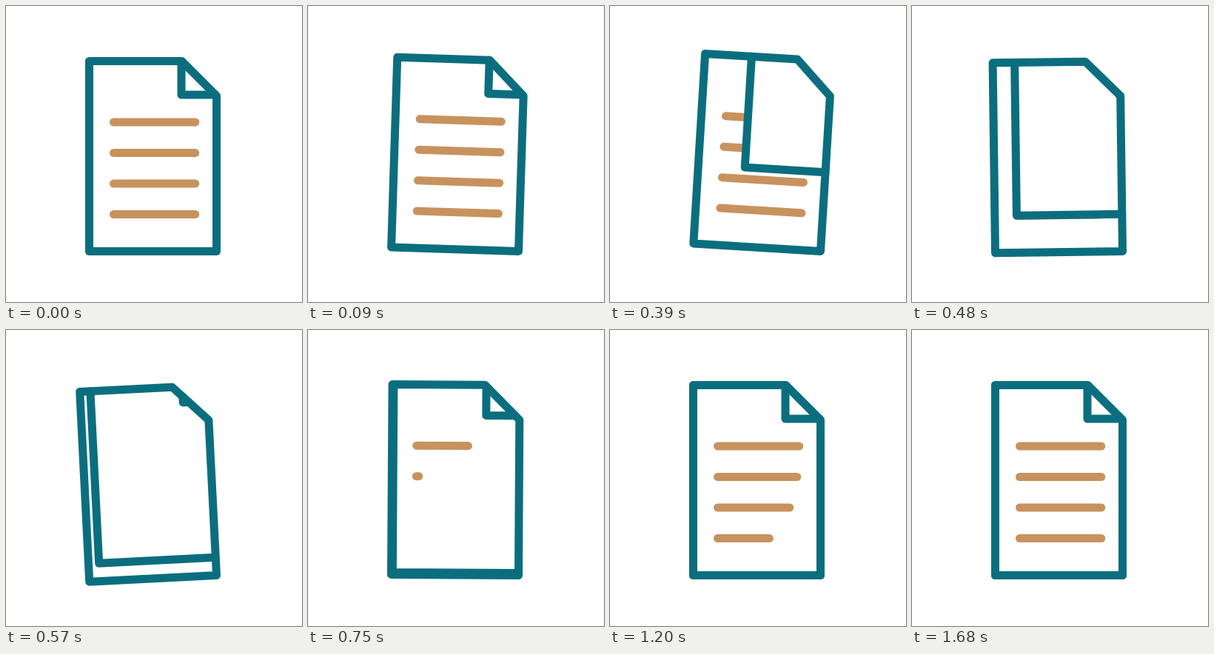
An HTML page with a canvas that plays this animation: 400x400 px, repeating every 3.9 s.

```html
<!DOCTYPE html>
<html lang="en">
<head>
<meta charset="utf-8">
<title>Page turn</title>
<style>
  html, body { margin: 0; width: 100%; height: 100%; overflow: hidden; background: #fff; }
  canvas { display: block; width: 400px; height: 400px; }
</style>
</head>
<body>
<canvas id="stage" width="400" height="400"></canvas>
<script>
const ctx = document.getElementById('stage').getContext('2d');
const LOOP = 3900, STEP = 30;
const TEAL = '#0b6e7f', TAN = '#c8925e';
const LEFT = 112.5, TOP = 74.5, RIGHT = 284.5, BOTTOM = 331.5;
const DIAGONAL = 163;                       // cut corner: x - y = DIAGONAL
const FOLD = [237, 120], FOLD_START = [254, 91], FOLD_END = [LEFT, BOTTOM];
const TILT = [[0, 0], [270, 7], [570, -2.9], [860, 1.9], [1140, 0]];

const clamp = v => Math.min(1, Math.max(0, v));
const mix = (a, b, p) => a + (b - a) * p;
const smooth = u => u * u * (3 - 2 * u);

// Cubic Bezier easing (1/3, 0, 0, 1): quick start, long settling.
function settle(p) {
  let low = 0, high = 1;
  for (let i = 0; i < 24; i++) {
    const u = (low + high) / 2;
    if (u * (1 - u) ** 2 + u ** 3 < p) low = u; else high = u;
  }
  return smooth((low + high) / 2);
}
const progress = (t, start, duration) => settle(clamp((t - start) / duration));

function tilt(t) {
  const next = TILT.findIndex(key => key[0] > t);
  if (next < 0) return 0;
  const [t0, a0] = TILT[next - 1], [t1, a1] = TILT[next];
  return mix(a0, a1, smooth((t - t0) / (t1 - t0)));
}

function stroke(color, points, closed) {
  ctx.beginPath();
  points.forEach(([x, y]) => ctx.lineTo(x, y));
  if (closed) ctx.closePath();
  ctx.strokeStyle = color;
  ctx.stroke();
}

function textLine(row, amount) {
  const y = 157 + row * 41.5;
  stroke(TAN, [[145.5, y], [mix(145.5, 255.8, amount), y]]);
}

// The turned corner, drawn only as far as the edges of the page.
function fold(from, to, p) {
  const x = mix(from[0], to[0], p), y = mix(from[1], to[1], p);
  const top = [x, Math.max(TOP, x - DIAGONAL)];
  const side = [Math.min(RIGHT, y + DIAGONAL), y];
  ctx.fillStyle = '#fff';
  ctx.beginPath();
  [top, [x, y], side, [RIGHT, RIGHT - DIAGONAL], [RIGHT - 47, TOP]]
    .forEach(([px, py]) => ctx.lineTo(px, py));
  ctx.fill();
  stroke(TEAL, [top, [x, y], side]);
}

function draw(t) {
  ctx.clearRect(0, 0, 400, 400);
  ctx.save();
  ctx.translate(RIGHT, BOTTOM);
  ctx.rotate(tilt(t) * Math.PI / 180);
  ctx.translate(-RIGHT, -BOTTOM);
  ctx.lineWidth = 11;
  ctx.lineCap = ctx.lineJoin = 'round';

  for (let row = 0; row < 4; row++) textLine(row, 1);
  fold(FOLD, FOLD_END, progress(t, 230, 645));
  if (t > 480) fold(FOLD_START, FOLD, progress(t, 480, 560));
  for (let row = 0; row < 4; row++) {
    const amount = progress(t, 540 + row * 150, 690);
    if (amount > 0.01) textLine(row, amount);
  }
  stroke(TEAL, [[LEFT, TOP], [RIGHT - 47, TOP], [RIGHT, RIGHT - DIAGONAL],
    [RIGHT, BOTTOM], [LEFT, BOTTOM]], true);
  ctx.restore();
}

const begin = performance.now();
function tick() {
  const t = (performance.now() - begin) % LOOP;
  draw(Math.floor(t / STEP) * STEP);
  requestAnimationFrame(tick);
}
tick();
</script>
</body>
</html>
```
